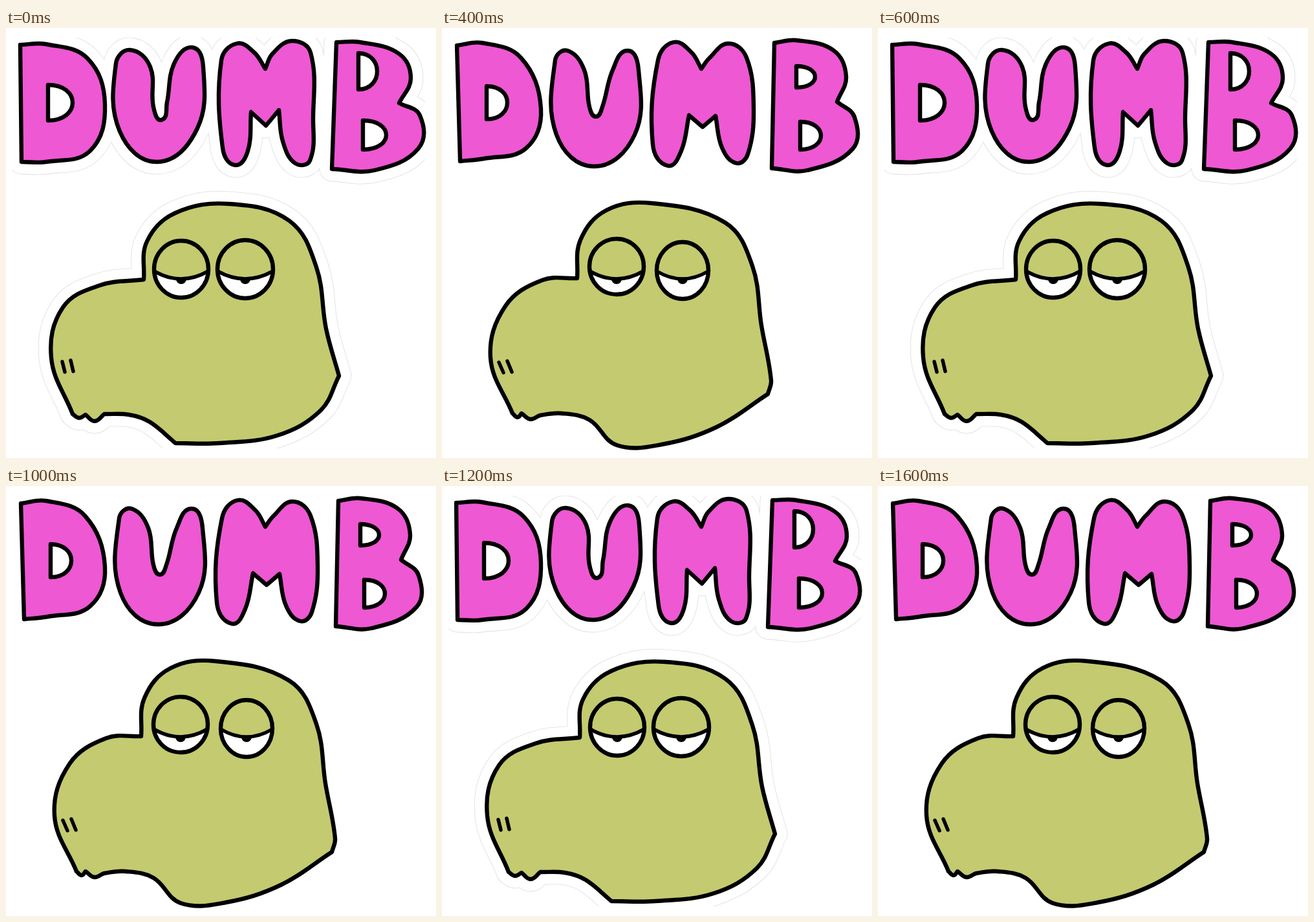
Animation of 665 by 665 pixels, one loop 1800 ms. Source, as an HTML page:

```html
<!DOCTYPE html>
<html lang="en">
<head>
<meta charset="utf-8">
<title>Dumb</title>
<style>
html, body { margin: 0; width: 100%; height: 100%; overflow: hidden; background: #fff; }
svg { display: block; width: 100vw; height: 100vh; }
path, ellipse { stroke-linejoin: round; stroke-linecap: round; }
</style>
</head>
<body>
<svg id="stage" viewBox="0 0 665 665">
  <clipPath id="sheet"><rect x="10" y="15" width="638" height="635"/></clipPath>
</svg>
<script>
const PINK = '#ee58d3', GREEN = '#c4ca70';
const STEP = 200, LINE = 6.4, MARGIN = 19;
const LID_SIDE = 376, LID_MIDDLE = 388;

// Key points of each outline; * marks a sharp corner.
const first = {
  D: '22,26* 62,25 126,47 153,118 130,190 62,207 24,207*',
  U: '170,55 192,34 223,60 228,122 241,142 249,115 260,55 288,30 305,60 296,155 235,207 176,160',
  M: '333,50 357,24 384,38 401,63* 412,40 442,20 471,38 475,140 470,205 447,209 428,175 422,127* 402,151* 379,130* 374,190 354,212 335,185',
  B: '511,22* 548,22 608,40 626,78 608,116* 640,135 638,186 570,220 504,218*',
  head: '213,389* 218,330 262,286 345,272 438,298 480,370 495,465 515,538* 487,591 420,630 330,642 262,642* 222,609 190,598 152,597* 137,608 123,598* 113,603 103,597* 70,510 88,432 145,398',
  holes: '65,88,38,55 545,39,29,56 552,143,36,45',
  eyes: '271,373,42,44 370,373,43,45',
  nostril: '87,516,4'
};

const last = {
  D: '23,27* 62,23 122,46 153,125 130,186 65,202 28,206*',
  U: '175,50 194,35 220,65 228,122 238,137 248,122 264,65 287,35 304,65 298,165 235,214 177,165',
  M: '334,50 358,22 386,38 401,63* 414,46 443,24 471,46 482,125 473,195 455,209 433,185 423,136* 403,153* 382,135* 370,190 349,213 326,180',
  B: '514,23* 548,19 606,35 625,75 611,114* 638,138 635,187 565,220 510,217*',
  head: '209,387* 214,328 254,282 325,271 438,301 480,368 494,460 509,545 504,566* 425,617 340,644 270,645 228,606 185,596 152,599 137,605 123,596* 117,602 109,596* 75,510 98,430 155,390',
  holes: '69,90,32,51 548,59,29,33 554,145,32,43',
  eyes: '270,369,42,43 372,375,40,44',
  nostril: '88,517,7'
};

const rows = text => text.split(' ').map(row => row.split(',').map(parseFloat));

// Average every number of two poses.
function blend(a, b) {
  const mix = key => {
    const other = b[key].match(/\d+/g);
    return a[key].replace(/\d+/g, n => (+n + +other.shift()) / 2);
  };
  return Object.fromEntries(Object.keys(a).map(key => [key, mix(key)]));
}

// Closed smooth curve through the key points.
function curve(text) {
  const pts = text.split(' ').map(s => {
    const [x, y] = s.split(',').map(parseFloat);
    return { x, y, corner: s.endsWith('*') };
  });
  const at = i => pts[(i + pts.length) % pts.length];
  const handle = (p, from, to, length) => {
    const dx = to.x - from.x, dy = to.y - from.y;
    const k = 0.37 * length / Math.hypot(dx, dy);
    return [p.x + dx * k, p.y + dy * k];
  };
  const parts = pts.map((p, i) => {
    const q = at(i + 1), length = Math.hypot(q.x - p.x, q.y - p.y);
    const out = handle(p, p.corner ? p : at(i - 1), q, length);
    const into = handle(q, q.corner ? q : at(i + 2), p, length);
    return `C${out} ${into} ${q.x},${q.y}`;
  });
  return `M${pts[0].x},${pts[0].y}${parts.join('')}Z`;
}

function add(parent, tag, attrs) {
  const el = document.createElementNS('http://www.w3.org/2000/svg', tag);
  for (const key in attrs) el.setAttribute(key, attrs[key]);
  parent.append(el);
  return el;
}

const ink = (g, d, fill = 'none', width = LINE, stroke = '#000') =>
  add(g, 'path', { d, fill, stroke, 'stroke-width': width });

function drawHole(g, [x, y, w, h]) {
  const bulge = x + w * 4 / 3;
  ink(g, `M${x},${y}C${bulge},${y} ${bulge},${y + h} ${x},${y + h}Z`, '#fff');
}

function drawEye(g, [cx, cy, rx, ry]) {
  const half = rx * Math.sqrt(1 - ((LID_SIDE - cy) / ry) ** 2);
  const left = cx - half, right = cx + half, r = 8;
  const lid = `M${left},${LID_SIDE}Q${cx},${2 * LID_MIDDLE - LID_SIDE} ${right},${LID_SIDE}`;
  add(g, 'path', { d: `${lid}A${rx},${ry} 0 0 1 ${left},${LID_SIDE}Z`, fill: '#fff' });
  add(g, 'path', { d: `M${cx - r},${LID_MIDDLE}a${r},${r} 0 0 0 ${2 * r},0Z` });
  ink(g, lid, 'none', 5.5);
  add(g, 'ellipse', { cx, cy, rx, ry, fill: 'none', stroke: '#000', 'stroke-width': LINE });
}

// Faint cut line at an even distance around all outlines.
function drawMargin(g, shapes) {
  const sheet = add(g, 'g', { 'clip-path': 'url(#sheet)' });
  for (const [color, grow] of [['#ddd', 0.4], ['#fff', -0.4]])
    shapes.forEach(d => ink(sheet, d, color, 2 * (MARGIN + grow), color));
}

function drawPose(pose, margin) {
  const g = add(stage, 'g', { opacity: 0 });
  const letters = [pose.D, pose.U, pose.M, pose.B].map(curve), head = curve(pose.head);
  if (margin) drawMargin(g, [...letters, head]);
  letters.forEach(d => ink(g, d, PINK));
  rows(pose.holes).forEach(hole => drawHole(g, hole));
  ink(g, head, GREEN);
  rows(pose.eyes).forEach(eye => drawEye(g, eye));
  const [x, y, slant] = rows(pose.nostril)[0];
  ink(g, `M${x},${y}l${slant},16m${13 - slant},-18l${slant},17`, 'none', 5.5);
  return g;
}

const stage = document.getElementById('stage');
const poses = [drawPose(first, true), drawPose(blend(first, last)), drawPose(last)];

function tick() {
  const now = Math.floor(performance.now() / STEP) % poses.length;
  poses.forEach((g, i) => g.setAttribute('opacity', i === now ? 1 : 0));
  requestAnimationFrame(tick);
}
tick();
</script>
</body>
</html>
```
